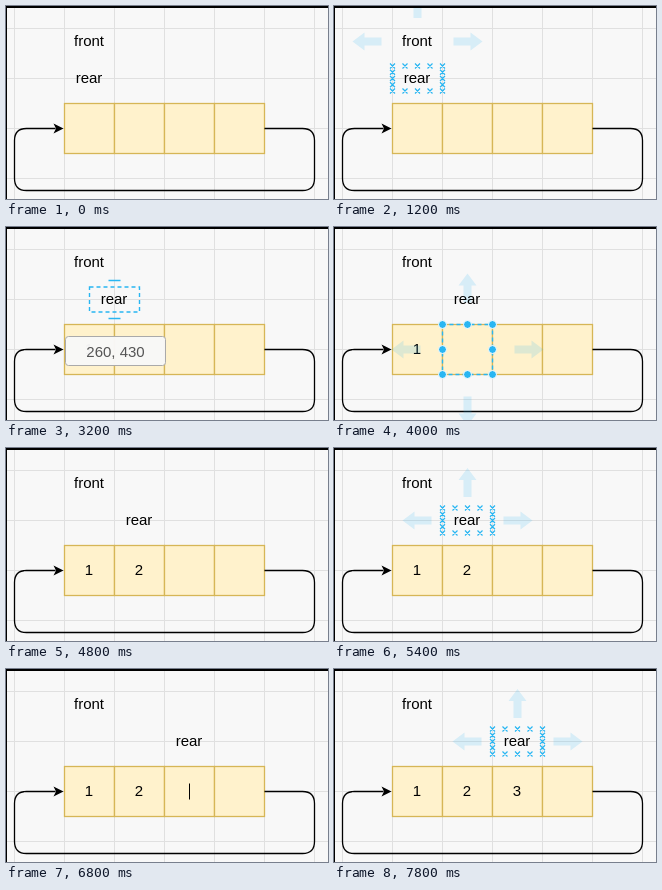
These frames come from a looping animation (322 px wide and 193 px high, 8 s). An HTML page:

```html
<!DOCTYPE html>
<html lang="en">
<head>
<meta charset="utf-8">
<title>Circular queue</title>
<style>
  html, body { margin: 0; width: 100%; height: 100%; overflow: hidden; background: #f8f8f8; }
  svg { display: block; width: 322px; height: 193px; }
  text { font: 15px "Liberation Sans", Arial, sans-serif; text-anchor: middle; }
</style>
</head>
<body>
<svg id="stage" viewBox="0 0 322 193">
  <rect width="322" height="193" fill="#f8f8f8"/>
  <g transform="translate(.5 .5)">
    <path id="grid" stroke="#e0e0e0" fill="none"/>
    <g id="cells" fill="#fff2cc" stroke="#d6b656" stroke-width="1.3"></g>
    <path d="M258 122H296Q308 122 308 134V172Q308 184 296 184H20Q8 184 8 172V134Q8 122 20 122H49"
          fill="none" stroke="#000" stroke-width="1.3"/>
    <path d="M57 122L47 127L49.500 122L47 117Z"/>
    <g id="digits"></g>
    <g id="overlay"></g>
    <text x="82.500" y="39.500">front</text>
    <text id="rear" y="76.500">rear</text>
    <g id="tip">
      <rect x="-49" y="109" width="100" height="29" rx="3" fill="#f8f8f8" fill-opacity=".97" stroke="#aaa"/>
      <text id="tipText" x="1" y="129" fill="#555"></text>
    </g>
  </g>
  <path d="M0 0H322V2H1V193H0Z"/>
</svg>
<script>
const LOOP = 8000, STEP = 200, CELL = 50, LEFT = 83;
const BLUE = '#29b6f2';
const FRONT = { x: LEFT, y: 35, h: 12.5 };
const $ = id => document.getElementById(id);
const range = n => [...Array(n).keys()];

$('grid').setAttribute('d',
  range(7).map(i => `M${8 + i * CELL} 0V193`).join('') +
  range(4).map(i => `M0 ${22 + i * CELL}H322`).join(''));
$('cells').innerHTML = range(4).map(i =>
  `<rect x="${58 + i * CELL}" y="97" width="50" height="50"/>`).join('');
$('digits').innerHTML = range(3).map(i =>
  `<text x="${82.5 + i * CELL}" y="126.500">${i + 1}</text>`).join('');
const digits = [...$('digits').children];

function outline({ x, y, h }) {
  return `<rect x="${x - 25}" y="${y - h}" width="50" height="${2 * h}" fill="none"
    stroke="${BLUE}" stroke-width="1.4" stroke-dasharray="4 3"/>`;
}

// Connection points at every quarter of the outline
function crosses({ x, y, h }) {
  let d = '';
  for (let i = -2; i <= 2; i++)
    for (let j = -2; j <= 2; j++)
      if (Math.abs(i) === 2 || Math.abs(j) === 2)
        d += `M${x + i * 12.5 - 2.5} ${y + j * h / 2 - 2.5}l5 5m0 -5l-5 5`;
  return `<path d="${d}" fill="none" stroke="${BLUE}" stroke-width="1.2"/>`;
}

function arrows({ x, y, h }, gap, angles) {
  return angles.map(a => {
    const tail = (a % 180 ? h : 25) + gap;
    return `<path transform="translate(${x} ${y}) rotate(${a}) translate(${tail} 0)"
      d="M0 -4H17V-9L29 0L17 9V4H0Z" fill="${BLUE}" opacity=".16"/>`;
  }).join('');
}

function handles({ x, y, h }) {
  let out = '';
  for (let i = -1; i <= 1; i++)
    for (let j = -1; j <= 1; j++)
      if (i || j) out += `<circle cx="${x + i * 25}" cy="${y + j * h}" r="4" fill="${BLUE}" stroke="#fff"/>`;
  return out;
}

function draw(time) {
  const tick = Math.floor(time % LOOP / STEP);
  const round = Math.floor((tick - 7) / 12);
  const step = tick - 7 - round * 12;
  const rear = { x: LEFT, y: 72, h: 12.5 };
  let marks = '', count = 0, dragging = false;

  if (round < 0) {
    if (tick >= 1 && tick <= 5) marks += crosses(FRONT);
    if (tick >= 3) marks += arrows(FRONT, 11, [0, 180, 270]);
    if (tick === 6) marks += crosses(rear);
  } else {
    const cell = { x: LEFT + round * CELL, y: 122, h: 25 };
    dragging = step >= 9;
    count = round + (step >= 4);
    rear.x = cell.x + (dragging ? 25 + (step - 9) * 12.5 : 0);

    if (step === 0) marks += crosses(rear);
    if (step === 1 || step === 2)
      marks += outline(cell) + handles(cell) + arrows(cell, 22, [0, 90, 180, 270]);
    if (step === 3) marks += `<path d="M${cell.x} 114v16" stroke="#000"/>`;
    if (step >= 6 && !dragging) marks += crosses(rear) + arrows(rear, 11, [0, 180, 270]);
    if (dragging) {
      const guide = step === 11
        ? `M${rear.x - 25} 2V84`
        : `M${rear.x - 6} 53h12M${rear.x - 6} 91h12`;
      marks += outline(rear) + `<path d="${guide}" stroke="${BLUE}" stroke-width="1.4"/>`;
    }
  }

  $('overlay').innerHTML = marks;
  $('rear').setAttribute('x', rear.x - .5);
  digits.forEach((el, i) => el.setAttribute('visibility', i < count ? 'visible' : 'hidden'));
  $('tip').setAttribute('visibility', dragging ? 'visible' : 'hidden');
  $('tip').setAttribute('transform', `translate(${rear.x} 0)`);
  $('tipText').textContent = `${240 + (rear.x - LEFT) / 1.25}, 430`;
}

const start = performance.now();
function frame() {
  draw(performance.now() - start);
  requestAnimationFrame(frame);
}
frame();
</script>
</body>
</html>
```
